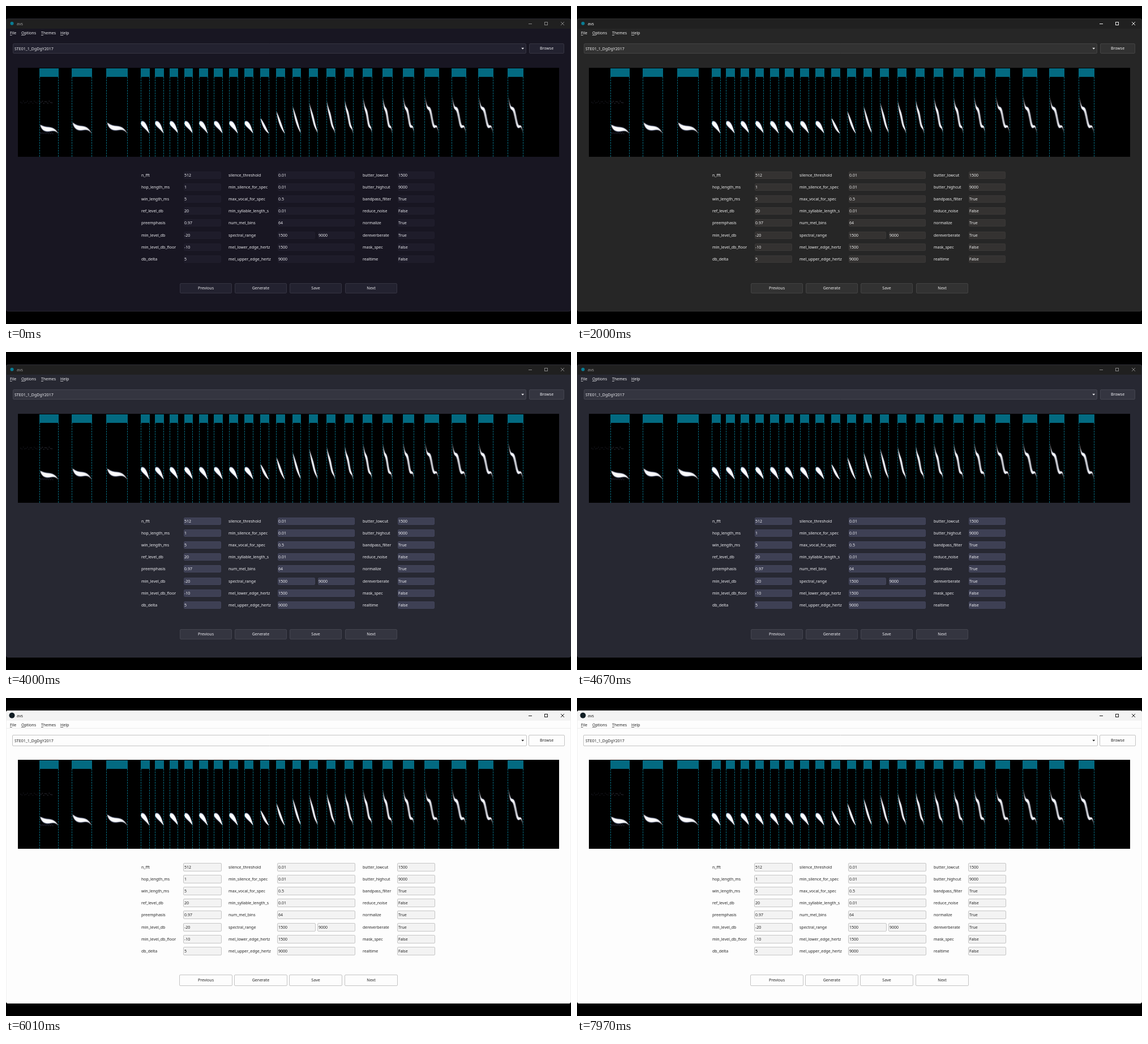
An HTML page with a canvas that plays this animation: 998x561 px, repeating every 8 s.

```html
<!DOCTYPE html>
<html lang="en">
<head>
<meta charset="utf-8">
<title>avs themes</title>
<style>
  html, body { margin: 0; width: 100%; height: 100%; overflow: hidden; background: #000; }
  canvas { display: block; }
</style>
</head>
<body>
<canvas id="stage" width="998" height="561"></canvas>
<script>
const LOOP = 8000;
const WAKE = 1940;
const ctx = document.getElementById('stage').getContext('2d');

const dark = { bar: '#202020', title: '#a0a0a0', icons: '#858585', logo: '#087d94', grow: 0 };
const themes = [
  { ...dark, from: 0, bg: '#181622', text: '#ececf0', field: '#1e1c2a', fieldEdge: '#201e2c',
    button: '#232230', edge: '#353441', frame: '#26252e' },
  { ...dark, from: 2000, bg: '#262626', text: '#f0f0f0', field: '#343231', fieldEdge: '#3a3837',
    button: '#323232', edge: '#434343', frame: '#2e2e2e', title: '#f5f5f5', icons: '#ededed' },
  { ...dark, from: 4000, bg: '#272832', text: '#f0f0f4', field: '#3e4054', fieldEdge: '#42445a',
    button: '#343540', edge: '#444550', frame: '#2d2e36' },
  { from: 6010, bg: '#fdfdfd', text: '#242424', field: '#f3f3f3', fieldEdge: '#c6c6c6',
    button: '#fdfdfd', edge: '#c4c4c4', frame: '#f0f0f0', bar: '#f3f3f3', title: '#1c1c1c',
    icons: '#1c1c1c', logo: '#101d24', grow: 1 }
];

const columns = [
  { label: 239, x: 314, w: 66, rows: ['n_fft 512', 'hop_length_ms 1', 'win_length_ms 5', 'ref_level_db 20',
    'preemphasis 0.97', 'min_level_db -20', 'min_level_db_floor -10', 'db_delta 5'] },
  { label: 393, x: 480, w: 136, rows: ['silence_threshold 0.01', 'min_silence_for_spec 0.01', 'max_vocal_for_spec 0.5',
    'min_syllable_length_s 0.01', 'num_mel_bins 64', 'spectral_range 1500 9000', 'mel_lower_edge_hertz 1500',
    'mel_upper_edge_hertz 9000'] },
  { label: 630, x: 692, w: 65, rows: ['butter_lowcut 1500', 'butter_highcut 9000', 'bandpass_filter True',
    'reduce_noise False', 'normalize True', 'dereverberate True', 'mask_spec False', 'realtime False'] }
];

// Smooth curve through evenly spaced values, by forward differences
function curve(values, s) {
  let sum = 0, factor = 1, row = values;
  for (let n = 0; row.length; n++) {
    sum += factor * row[0];
    factor *= (s - n) / (n + 1);
    row = row.slice(1).map((v, i) => v - row[i]);
  }
  return sum;
}

const plateau = u => .5 + .5 * (2 * u - 1) ** 3;
const fall = u => u ** 1.6;
const sweep = wave => u => u + .08 * Math.sin(Math.PI * u) + wave * Math.sin(4 * Math.PI * u);

// Three phrases: long flat notes, quickening chirps that grow into sweeps, long sweeps
function makeCalls() {
  const calls = [];
  for (let i = 0; i < 3; i++) {
    calls.push({ left: curve([59, 116, 177], i), width: 34 + 2 * i, top: i ? 206 : 210, path: plateau, thick: 3.5, skew: .65 });
  }
  for (let i = 0; i < 18; i++) {
    const growth = Math.max(0, 1 - Math.exp((7.5 - i) / 2.8));
    const late = Math.max(0, (i - 10) / 7);
    calls.push({
      left: curve([238, 341, 449, 566, 701], i / 4),
      width: 15.5 + 10 * (i / 17) ** 12,
      top: 206 - 47 * growth,
      path: growth ? sweep(.08 * late) : fall,
      thick: growth ? 2.2 + .4 * late : 3.7,
      skew: growth ? .85 : .6
    });
  }
  for (let i = 0; i < 3; i++) {
    calls.push({ left: curve([787, 834, 886], i), width: 26 + i, top: 161, path: sweep(.08), thick: 2.7, skew: .85 });
  }
  return calls;
}

function drawTrace(c, { left, width, top, path, thick, skew }) {
  const bottom = 225;
  const layer = (color, scale) => {
    c.fillStyle = color;
    for (let u = 0; u <= 1; u += 1 / 64) {
      const r = scale * (.5 + thick * Math.sin(Math.PI * u ** skew));
      c.beginPath();
      c.ellipse(left + width * (.05 + .93 * u), top + (bottom - top) * path(u), r * .7, r * 1.1, 0, 0, 2 * Math.PI);
      c.fill();
    }
  };
  layer('rgba(110,115,150,.06)', 1.3);
  layer('rgba(205,205,225,.14)', 1);
  layer('rgba(255,255,255,.35)', .8);
}

function makeSpectrogram() {
  const canvas = document.createElement('canvas');
  canvas.width = 998;
  canvas.height = 561;
  const c = canvas.getContext('2d');
  rect(c, 21, 109, 956, 157, '#000');
  for (let i = 0; i < 24; i++) {
    rect(c, 25 + i * 2.4, 169 + 2 * Math.sin(i * 2.3), 1.8, 1.4, i > 13 ? '#292932' : '#15151b');
    if (i < 12) rect(c, 60 + i * 2, 223 + 2 * Math.sin(i * 3.1), 1.3, 2.5, '#1c1c28');
  }
  c.setLineDash([3, 1.6]);
  for (const call of makeCalls()) {
    const left = Math.round(call.left), right = Math.round(call.left + call.width);
    drawTrace(c, call);
    rect(c, left, 110, right - left, 15, '#036a81');
    for (const x of [left + .5, right - .5]) line(c, '#076d81', x, 125, x, 266);
  }
  return canvas;
}

function rect(c, x, y, w, h, fill) {
  c.fillStyle = fill;
  c.fillRect(x, y, w, h);
}

function line(c, color, x1, y1, x2, y2) {
  c.strokeStyle = color;
  c.beginPath();
  c.moveTo(x1, y1);
  c.lineTo(x2, y2);
  c.stroke();
}

function box(x, y, w, h, fill, edge, grow) {
  ctx.beginPath();
  ctx.roundRect(x + .5 - grow, y + .5 - grow, w - 1 + 2 * grow, h - 1 + 2 * grow, 1.5);
  ctx.fillStyle = fill;
  ctx.fill();
  ctx.strokeStyle = edge;
  ctx.stroke();
}

function text(string, x, y, color, align = 'left') {
  ctx.font = '7px "Noto Sans", sans-serif';
  ctx.textAlign = align;
  ctx.fillStyle = color;
  ctx.fillText(string, x, y + 2.6);
}

function drawWindow(t, theme) {
  rect(ctx, 0, 0, 998, 561, '#000');
  ctx.save();
  ctx.beginPath();
  ctx.roundRect(0, 22, 998, 517, 4);
  ctx.clip();
  rect(ctx, 0, 22, 998, 517, theme.bg);
  rect(ctx, 0, 22, 998, 18, theme.bar);
  if (theme.grow) rect(ctx, 0, 53, 998, 1, '#ececec');
  ctx.restore();
  ctx.beginPath();
  ctx.roundRect(.5, 22.5, 997, 516, 4);
  ctx.strokeStyle = theme.frame;
  ctx.stroke();

  ctx.fillStyle = theme.logo;
  ctx.beginPath();
  ctx.arc(10.5, 30.7, 3 + 2 * theme.grow, 0, 2 * Math.PI);
  ctx.fill();
  text('avs', 19, 31, theme.title);

  const awake = t >= WAKE && t < themes[1].from;
  line(ctx, awake ? '#ededed' : theme.icons, 923, 31.5, 929, 31.5);
  line(ctx, theme.icons, 980, 28, 986, 34);
  line(ctx, theme.icons, 986, 28, 980, 34);
  ctx.strokeRect(951.5, 28.5, 5, 5);

  ['File', 'Options', 'Themes', 'Help'].forEach((name, i) => {
    const x = curve([7, 27, 62, 96], i);
    text(name, x, 47.5, theme.text);
    rect(ctx, x, 51, ctx.measureText(name[0]).width, .7, theme.text);
  });
}

function drawButton(theme, label, x, y, w) {
  box(x, y, w, 18, theme.button, theme.edge, theme.grow);
  text(label, x + w / 2, y + 8.7, theme.text, 'center');
}

function drawControls(theme) {
  drawButton(theme, '', 12, 66, 907);
  text('STE01_1_DgDgY2017', 15, 75, theme.text);
  ctx.beginPath();
  ctx.moveTo(910.3, 73.8);
  ctx.lineTo(915.1, 73.8);
  ctx.lineTo(912.7, 76.4);
  ctx.fill();
  drawButton(theme, 'Browse', 924, 66, 62);
  ['Previous', 'Generate', 'Save', 'Next'].forEach((name, i) => drawButton(theme, name, Math.round(307 + 97.2 * i), 489, 92));

  for (const { label, x, w, rows } of columns) {
    rows.forEach((row, i) => {
      const [name, ...values] = row.split(' ');
      const y = 298 + 21.2 * i;
      text(name, label, y, theme.text);
      values.forEach((value, k) => {
        const left = x + 71 * k;
        box(left, Math.round(y - 6.4), values.length > 1 ? 66 - k : w, 13, theme.field, theme.fieldEdge, theme.grow);
        text(value, left + 1, y, theme.text);
      });
    });
  }
}

const spectrogram = makeSpectrogram();
const start = performance.now();

function frame() {
  const t = (performance.now() - start) % LOOP;
  const theme = themes.findLast(item => t >= item.from);
  drawWindow(t, theme);
  drawControls(theme);
  ctx.drawImage(spectrogram, 0, 0);
  requestAnimationFrame(frame);
}
frame();
</script>
</body>
</html>
```
